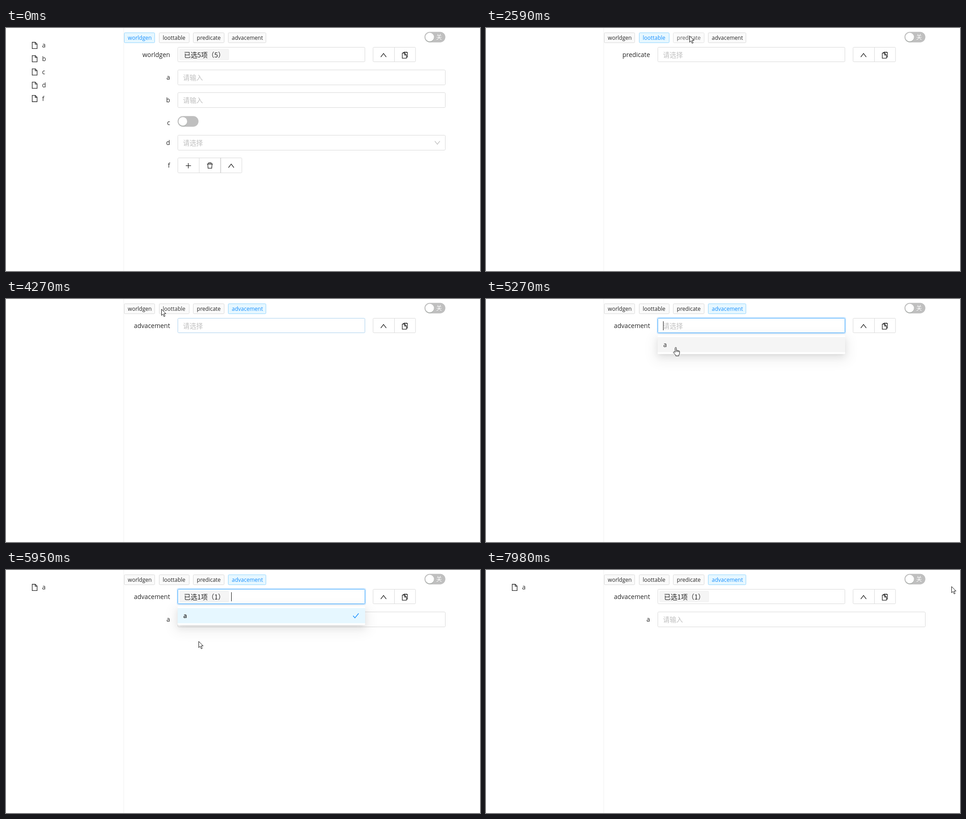
These frames come from a looping animation (1044 by 536 pixels, 8000 ms). An HTML page:

```html
<!DOCTYPE html>
<html lang="zh-CN">
<head>
<meta charset="utf-8">
<title>Form tabs</title>
<style>
html, body { margin: 0; width: 100%; height: 100%; overflow: hidden; background: #fff; }
svg { display: block; width: 100vw; height: 100vh; }
text { font-family: "Open Sans", "Noto Sans", sans-serif; fill: #262626; }
.cjk { font-family: "Noto Sans CJK SC", "Noto Sans CJK", sans-serif; font-size: 14.67px; }
.hint { fill: #bfbfbf; }
.label { font-size: 13.9px; }
.tag { font-size: 12px; }
.icon { fill: none; stroke: #262626; stroke-width: 1.3; }
.pointer { fill: #fff; stroke: #111; stroke-width: 1; stroke-linejoin: round; }
</style>
</head>
<body>
<svg id="stage" viewBox="0 0 1044 536">
  <defs>
    <filter id="blur3" x="-20%" y="-100%" width="140%" height="300%"><feGaussianBlur stdDeviation="3"/></filter>
    <filter id="blur8" x="-20%" y="-100%" width="140%" height="300%"><feGaussianBlur stdDeviation="8"/></filter>
    <filter id="blur14" x="-20%" y="-200%" width="140%" height="500%"><feGaussianBlur stdDeviation="14"/></filter>
  </defs>
  <g id="scene"></g>
</svg>
<script>
const LOOP = 8000;
const GRAY = '#d9d9d9', BLUE = '#40a9ff', INK = '#262626';
const TAGS = [['worldgen', 260, 68], ['loottable', 337, 67], ['predicate', 412, 69], ['advacement', 489, 84]];
const scene = document.getElementById('scene');

// Each step keeps the values of the step before it.
const steps = [
  { at: 0, label: 'worldgen', active: 0, hover: -1, fade: .8, count: 5, rows: 'abcdf', border: GRAY, menu: 0, focus: false, cursor: null },
  { at: 480, cursor: ['arrow', 338, -8] },
  { at: 820, cursor: ['arrow', 347, 27], hover: 1, fade: .9 },
  { at: 1160, cursor: ['arrow', 351, 26], fade: .75 },
  { at: 1490, cursor: ['arrow', 355, 23] },
  { at: 1820, cursor: ['arrow', 359, 30], label: 'loottable', active: 1, count: 0, rows: '' },
  { at: 2150, cursor: ['arrow', 448, 17], hover: 2 },
  { at: 2590, label: 'predicate' },
  { at: 2930, cursor: ['beam', 490, 55], active: 2, hover: -1, border: BLUE },
  { at: 3270, cursor: ['arrow', 523, 19], hover: 3, border: GRAY },
  { at: 3600, cursor: ['beam', 505, 67], label: 'advacement', active: 3, hover: -1, border: '#8ac4f0' },
  { at: 3930, cursor: ['beam', 440, 58], border: BLUE },
  { at: 4270, cursor: ['arrow', 342, 22], hover: 1, fade: .93, border: '#a9d0ee' },
  { at: 4610, cursor: ['beam', 400, 60], border: BLUE },
  { at: 4940, cursor: ['beam', 408, 62], hover: -1, focus: true, menu: .8 },
  { at: 5270, cursor: ['hand', 412, 106], menu: 1 },
  { at: 5610, cursor: ['arrow', 418, 125], count: 1, rows: 'a' },
  { at: 5950, cursor: ['arrow', 424, 157] },
  { at: 6290, cursor: ['arrow', 626, 155] },
  { at: 6630, cursor: ['arrow', 901, 163], border: GRAY, focus: false, menu: 0 },
  { at: 6970, cursor: ['beam', 950, 109] },
  { at: 7310, cursor: ['arrow', 932, 34] },
  { at: 7640, cursor: ['arrow', 222, 55] },
  { at: 7980, cursor: ['arrow', 1025, 36] }
];
for (let i = 1; i < steps.length; i++) steps[i] = { ...steps[i - 1], ...steps[i] };

const text = (x, y, s, cls, more = '') => `<text x="${x}" y="${y}" class="${cls}" ${more}>${s}</text>`;
const label = (y, s) => text(361.3, y, s, 'label', 'text-anchor="end"');
const icon = (d, more = '') => `<path class="icon" d="${d}" ${more}/>`;
const fill = (x, y, w, h, color, more = '') => `<rect x="${x}" y="${y}" width="${w}" height="${h}" fill="${color}" ${more}/>`;
const box = (x, y, w, h, stroke = GRAY, color = '#fff') =>
  fill(x + .5, y + .5, w - 1, h - 1, color, `stroke="${stroke}" rx="2"`);
const up = (x, y) => icon(`M${x - 6} ${y + 4.5}l6 -8 6 8`);

function toggle(x, y) {
  const cx = x + 11.5, cy = y + 11.7;
  return fill(x, y, 46, 23.4, '#bfbfbf', 'rx="11.7"') +
    `<circle cx="${cx}" cy="${cy + 1.5}" r="9.8" fill="#00230b" opacity=".1"/>` +
    `<circle cx="${cx}" cy="${cy}" r="9.5" fill="#fff"/>`;
}

function tag([name, x, w], i, s) {
  const on = i === s.active;
  return `<g opacity="${i === s.hover ? s.fade : 1}">` +
    box(x, 10, w, 23, on ? '#91d5ff' : GRAY, on ? '#e6f7ff' : '#fafafa') +
    text(x + 8.3, 26, name, 'tag', on ? 'style="fill:#1890ff"' : '') + '</g>';
}

function sideItem(name, i) {
  const y = 38.3 + i * 29.3;
  return icon(`M57.7 ${y - 6.8}h6.8l4 4v9.8h-10.8zM64.3 ${y - 6.5}v4h4`) + text(79.5, y + 5, name, 'label');
}

const input = y => box(378, y, 590, 34) + text(389.8, y + 23.2, '请输入', 'cjk hint');

const fields = {
  a: () => label(114, 'a') + input(92),
  b: () => label(164, 'b') + input(142),
  c: () => label(214, 'c') + toggle(378, 194.3),
  d: () => label(258, 'd') + box(378, 236, 590, 34) + text(389.8, 259.2, '请选择', 'cjk hint') +
    icon('M944.5 249.5l5.5 7 5.5 -7', 'style="stroke:#bfbfbf"'),
  f: () => label(308, 'f') + box(378, 286, 142, 34) +
    fill(425, 286, 1, 34, GRAY) + fill(472, 286, 1.6, 34, '#cfcfcf') +
    icon('M401.5 298v11.5M396 303.7h11.5') +
    icon('M442.8 300h12.6M446.5 299.8v-2.6h5.2v2.6M444.4 300.2l.7 9.1h8l.7 -9.1') + up(496, 303.5)
};

function select(s) {
  const ring = s.focus ? fill(377, 41, 415, 35, 'none', 'rx="3" stroke="#1890ff" stroke-opacity=".2" stroke-width="2"') : '';
  const value = s.count
    ? fill(382.5, 46.5, 108, 24, '#f5f5f5', 'stroke="#f0f0f0" rx="2"') + text(392, 64.5, `已选${s.count}项（${s.count}）`, 'cjk')
    : text(389.8, 65.4, '请选择', 'cjk hint');
  const caret = s.focus ? fill(s.count ? 496 : 390, 49, 1, 20, '#111') : '';
  return ring + box(378, 42, 413, 33, s.border) + value + caret;
}

const buttons = () => box(808, 42, 94.5, 33) + fill(855, 42, 1, 33, GRAY) + up(831.5, 59.5) +
  icon('M872.8 55.4h5.2l4 4v7.2h-9.2zM877.8 55.5v4h4M875.3 55.2v-1.6h8.9v10.6h-2M878.2 52v3M881.5 52v3');

function menu(s) {
  if (!s.menu) return '';
  const picked = s.count > 0;
  const shadow = (grow, dy, blur, alpha) =>
    fill(378 - grow, 80 + dy - grow, 413 + 2 * grow, 41 + 2 * grow, '#000', `opacity="${alpha}" filter="url(#blur${blur})"`);
  return `<g opacity="${s.menu}">` + shadow(-4, 3, 3, .12) + shadow(0, 6, 8, .08) + shadow(8, 9, 14, .05) +
    fill(378, 80, 413, 41.5, '#fff', 'rx="2"') + fill(378, 84, 413, 33.5, picked ? '#e6f7ff' : '#f5f5f5') +
    text(390.5, 106, 'a', 'label', picked ? 'font-weight="600"' : '') +
    (picked ? icon('M764.5 101l4 4.7 8.2 -10', 'style="stroke:#1890ff;stroke-width:1.5"') : '') + '</g>';
}

const pointers = {
  arrow: '<path class="pointer" d="M.5 .5v13.7l3.1 -3 2.4 5.6 2.3 -1 -2.4 -5.4h4.3z"/>',
  hand: '<path class="pointer" d="M4.5 11.5V2.2c0 -2 2.8 -2 2.8 0v5.3c.5 -1 2.3 -.8 2.5 .4 .7 -.8 2.2 -.5 2.4 .6 ' +
    '.9 -.6 2.1 0 2.1 1.3v4.4l-1.7 3.6v1.7H5.9v-1.7L1.1 12.6c-1.1 -1.6 .8 -2.9 2 -1.7zM7.3 7.5v3.3M9.8 8v3M12.2 8.6v2.6"/>',
  beam: '<path d="M-3 -9h2.3l.7 .7 .7 -.7h2.3M0 -8.3v16.6M-3 9h2.3l.7 -.7 .7 .7h2.3" fill="none" stroke="#111"/>'
};

function draw(s) {
  scene.innerHTML = fill(259, 0, 1, 536, '#f0f0f0') +
    [...s.rows].map(sideItem).join('') +
    TAGS.map((t, i) => tag(t, i, s)).join('') +
    toggle(921.7, 8.4) + text(947.6, 24.4, '关', 'cjk', 'style="font-size:12.6px;fill:#fff"') +
    label(63.5, s.label) +
    [...s.rows].map(name => fields[name]()).join('') +
    select(s) + buttons() + menu(s) +
    (s.cursor ? `<g transform="translate(${s.cursor[1]} ${s.cursor[2]})">${pointers[s.cursor[0]]}</g>` : '');
}

let shown = null;
function tick() {
  const t = performance.now() % LOOP;
  const step = steps.findLast(s => s.at <= t);
  if (step !== shown) draw(shown = step);
  requestAnimationFrame(tick);
}
tick();
</script>
</body>
</html>
```
